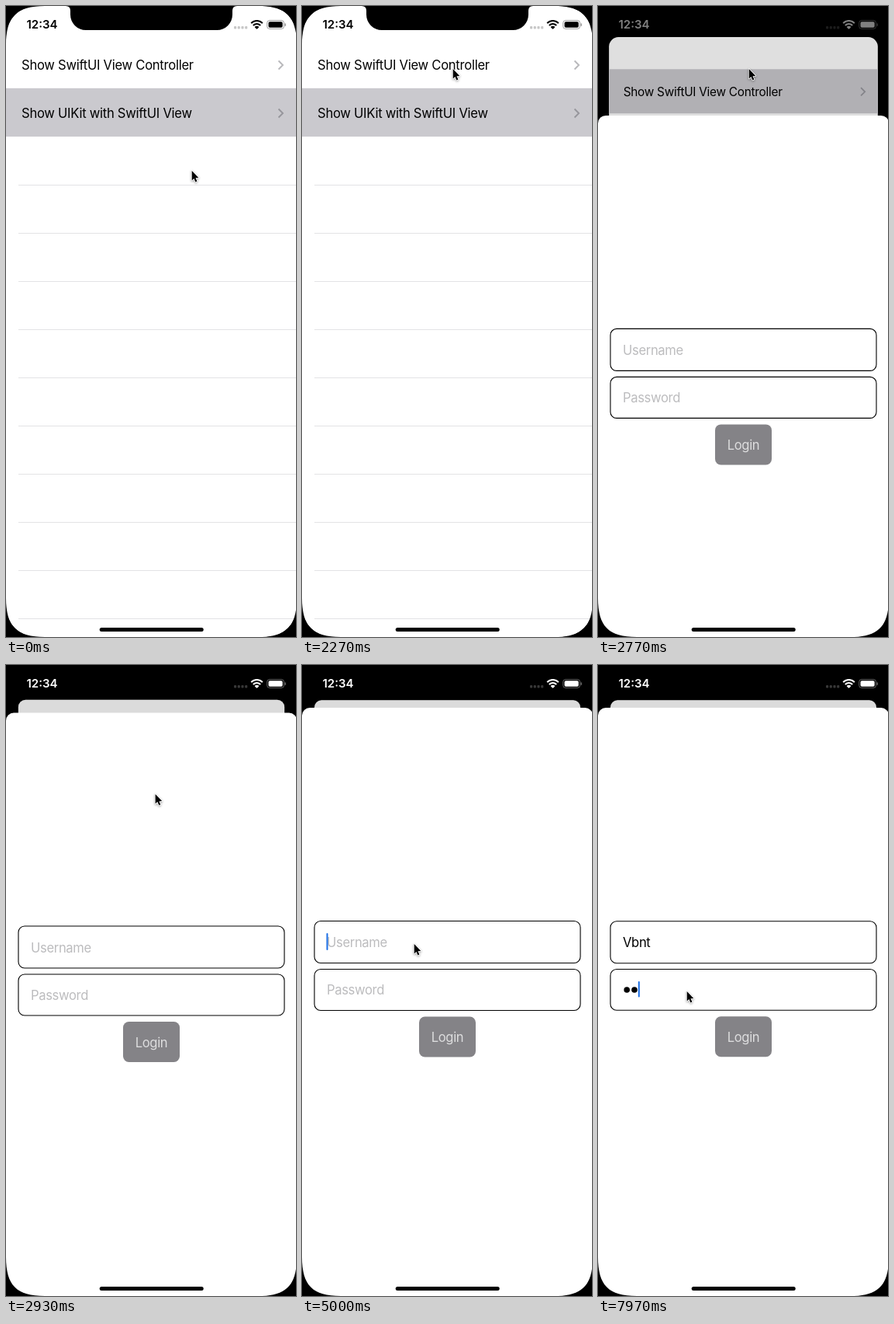
Recreate the animation shown at these times as an HTML page with a canvas. Size 374 by 812 pixels, loop 8000 ms.

```html
<!DOCTYPE html>
<html lang="en">
<head>
<meta charset="utf-8">
<title>Login sheet</title>
<style>
  html, body { margin: 0; width: 100%; height: 100%; overflow: hidden; background: #000; }
  canvas { display: block; width: 374px; height: 812px; }
</style>
</head>
<body>
<canvas id="stage"></canvas>
<script>
const W = 374, H = 812, VIEW_W = 375, LOOP = 8000, STEP = 100 / 3;
const canvas = document.getElementById('stage');
const ctx = canvas.getContext('2d');
const dpr = window.devicePixelRatio || 1;
canvas.width = W * dpr;
canvas.height = H * dpr;

const SHEET_TOP = 55, CARET = '#1b6fe6', HIGHLIGHT = '#cac9ce';
const TYPED = [[6000, 'V'], [6230, 'Vb'], [6430, 'Vbn'], [6600, 'Vbnt']];

// Pointer tip: time, x, y
const PATH = [
  [1467, 239, 211], [1500, 236, 209], [2267, 194, 80],
  [2800, 194, 80], [3167, 187, 364], [3300, 187, 364], [3533, 178, 360],
  [4767, 178, 360], [4900, 144, 358], [6600, 144, 358], [6800, 119, 416],
  [6967, 119, 416], [7167, 114, 419]
];

const clamp = v => Math.max(0, Math.min(1, v));
const ramp = (t, a, b) => clamp((t - a) / (b - a));
const smooth = v => v * v * (3 - 2 * v);

// Critically damped spring, 0 to 1
function spring(t) {
  const w = 18.45 * Math.max(0, t - 2564.5) / 1000;
  return 1 - (1 + w) * Math.exp(-w);
}

function pointerAt(t) {
  let i = 0;
  while (i < PATH.length - 2 && t > PATH[i + 1][0]) i++;
  const [t0, x0, y0] = PATH[i], [t1, x1, y1] = PATH[i + 1];
  const k = smooth(ramp(t, t0, t1));
  return [x0 + (x1 - x0) * k, y0 + (y1 - y0) * k];
}

function box(x, y, w, h, r, fill) {
  ctx.beginPath();
  ctx.roundRect(x, y, w, h, r);
  if (fill) {
    ctx.fillStyle = fill;
    ctx.fill();
  }
}

function setFont(weight, size, spacing) {
  ctx.font = `${weight} ${size}px Inter, "Liberation Sans", sans-serif`;
  ctx.letterSpacing = spacing + 'px';
}

function label(str, x, y, color, spacing = -0.35, align = 'left') {
  setFont(400, 16.6, spacing);
  ctx.textAlign = align;
  ctx.fillStyle = color;
  ctx.fillText(str, x, y);
}

function chevron(y) {
  ctx.beginPath();
  ctx.moveTo(351.5, y - 5.5);
  ctx.lineTo(357, y);
  ctx.lineTo(351.5, y + 5.5);
  ctx.strokeStyle = 'rgba(60,60,67,.36)';
  ctx.lineWidth = 1.9;
  ctx.stroke();
}

function drawList(t, p) {
  const scale = 1 - 0.0853 * p;
  const secondOn = t < 2560;
  ctx.save();
  ctx.translate(VIEW_W * (1 - scale) / 2, 45.2 * p);
  ctx.scale(scale, scale);
  box(0, 0, VIEW_W, H, 39 - 29 * p, '#fff');
  ctx.clip();
  ctx.fillStyle = '#e3e3e5';
  for (let y = secondOn ? 230 : 168; y < H; y += 62) ctx.fillRect(16, y, VIEW_W, 1);
  ctx.fillStyle = HIGHLIGHT;
  if (t >= 2430) ctx.fillRect(0, 44.6, VIEW_W, 61.6);
  if (secondOn) ctx.fillRect(0, 105.8, VIEW_W, 62.3);
  label('Show SwiftUI View Controller', 20, 82, '#000', -0.27);
  label('Show UIKit with SwiftUI View', 20, 144, '#000', -0.27);
  chevron(76);
  chevron(138);
  ctx.fillStyle = `rgba(0,0,0,${0.142 * p})`;
  ctx.fillRect(0, 0, VIEW_W, H);
  ctx.restore();
}

function field(y, h) {
  box(16, y, 343, h, 8);
  ctx.strokeStyle = '#000';
  ctx.lineWidth = 1.1;
  ctx.stroke();
}

function drawCaret(x, y, h, alpha) {
  ctx.globalAlpha = alpha;
  box(x, y, 2, h, 1, CARET);
  ctx.globalAlpha = 1;
}

function drawSheet(t, p) {
  if (p <= 0) return;
  ctx.save();
  ctx.translate(0, (H - SHEET_TOP) * (1 - p));
  box(0, SHEET_TOP, VIEW_W, H, 10, '#fff');

  const dots = (t >= 7600) + (t >= 7870);
  const nudge = dots ? 0.2 : 0;
  field(329.5 + nudge, 54);
  field(391.5, 53 - nudge);
  box(151, 452.5 - nudge, 73, 52, 7.5, '#848387');
  label('Login', 187.5, 485 - nudge, '#dededf', -0.35, 'center');

  const name = TYPED.reduce((s, [at, v]) => t >= at ? v : s, '');
  label(name || 'Username', 32, 363, name ? '#000' : '#bcbcbe');
  if (t >= 5000 && t < 7300) {
    const x = 31.5 + ctx.measureText(name).width;
    const blink = 1 - ramp(t, 5367, 5500) + ramp(t, 5700, 5867);
    drawCaret(x, 345, 22, blink);
  }

  if (!dots) label('Password', 32, 424, '#bcbcbe');
  for (let i = 0; i < dots; i++) {
    ctx.beginPath();
    ctx.arc(37.2 + 9.8 * i, 418, 3.8, 0, 7);
    ctx.fillStyle = '#000';
    ctx.fill();
  }
  if (t >= 7300) drawCaret(31.6 + 10.1 * dots, 407, 20.5, 1);
  ctx.restore();
}

function drawStatus(t) {
  const v = Math.round(255 * smooth(ramp(t, 2633, 2900)));
  const color = `rgb(${v},${v},${v})`;
  const faded = a => `rgba(${v},${v},${v},${a})`;
  setFont(600, 15, 0);
  ctx.textAlign = 'center';
  ctx.fillStyle = color;
  ctx.fillText('12:34', 46.5, 29.3);

  for (let i = 0; i < 4; i++) box(294 + 4.7 * i, 26, 3.2, 3.4, 1, faded(0.22));

  // Wi-Fi fan
  ctx.save();
  ctx.beginPath();
  ctx.moveTo(323.5, 30.2);
  ctx.lineTo(312.5, 18);
  ctx.lineTo(334.5, 18);
  ctx.closePath();
  ctx.clip();
  ctx.strokeStyle = color;
  for (const r of [1.5, 6.2, 10.2]) {
    ctx.beginPath();
    ctx.arc(323.5, 29.2, r, Math.PI, 2 * Math.PI);
    ctx.lineWidth = r < 2 ? 4 : 2.1;
    ctx.stroke();
  }
  ctx.restore();

  box(336.7, 18.6, 21.8, 10.8, 3.2);
  ctx.strokeStyle = faded(0.38);
  ctx.lineWidth = 1;
  ctx.stroke();
  box(338.5, 20.3, 18.2, 7.4, 1.8, color);
  box(359.6, 22.2, 1.4, 3.8, 0.7, faded(0.42));
}

// Black outside a smooth-cornered screen edge
function screenCorner(x, y, sx, sy) {
  const reach = 50, pull = 13.7;
  ctx.beginPath();
  ctx.moveTo(x, y);
  ctx.lineTo(x, y + sy * reach);
  ctx.bezierCurveTo(x, y + sy * pull, x + sx * pull, y, x + sx * reach, y);
  ctx.fill();
}

function drawDevice() {
  ctx.fillStyle = '#000';
  screenCorner(0, 0, 1, 1);
  screenCorner(VIEW_W, 0, -1, 1);
  screenCorner(0, H, 1, -1);
  screenCorner(VIEW_W, H, -1, -1);
  ctx.beginPath();
  ctx.moveTo(77, 0);
  ctx.quadraticCurveTo(83, 0, 83, 6);
  ctx.lineTo(83, 11);
  ctx.arcTo(83, 31, 103, 31, 20);
  ctx.lineTo(272, 31);
  ctx.arcTo(292, 31, 292, 11, 20);
  ctx.lineTo(292, 6);
  ctx.quadraticCurveTo(292, 0, 298, 0);
  ctx.fill();
  box(120.7, 800, 134, 5, 2.5, '#000');
}

function drawPointer(t) {
  const [x, y] = pointerAt(t);
  ctx.save();
  ctx.translate(x, y);
  ctx.beginPath();
  ctx.moveTo(0.7, 1);
  ctx.lineTo(0.7, 13.4);
  ctx.lineTo(3.4, 10.9);
  ctx.lineTo(5.4, 15.4);
  ctx.lineTo(7.4, 14.5);
  ctx.lineTo(5.5, 10.2);
  ctx.lineTo(9.3, 9.9);
  ctx.closePath();
  ctx.shadowColor = 'rgba(0,0,0,.4)';
  ctx.shadowBlur = 3 * dpr;
  ctx.shadowOffsetY = dpr;
  ctx.lineWidth = 1.6;
  ctx.lineJoin = 'round';
  ctx.strokeStyle = '#fff';
  ctx.stroke();
  ctx.shadowColor = 'transparent';
  ctx.fillStyle = '#000';
  ctx.fill();
  ctx.restore();
}

function draw(now) {
  // Motion advances at 30 steps per second
  const t = Math.floor((now % LOOP + 3.4) / STEP) * STEP;
  const p = spring(t);
  ctx.setTransform(dpr, 0, 0, dpr, 0, 0);
  ctx.fillStyle = '#000';
  ctx.fillRect(0, 0, W, H);
  drawList(t, p);
  drawSheet(t, p);
  drawDevice();
  drawStatus(t);
  drawPointer(t);
}

const start = performance.now();
function tick() {
  draw(performance.now() - start);
  requestAnimationFrame(tick);
}
tick();
</script>
</body>
</html>
```
